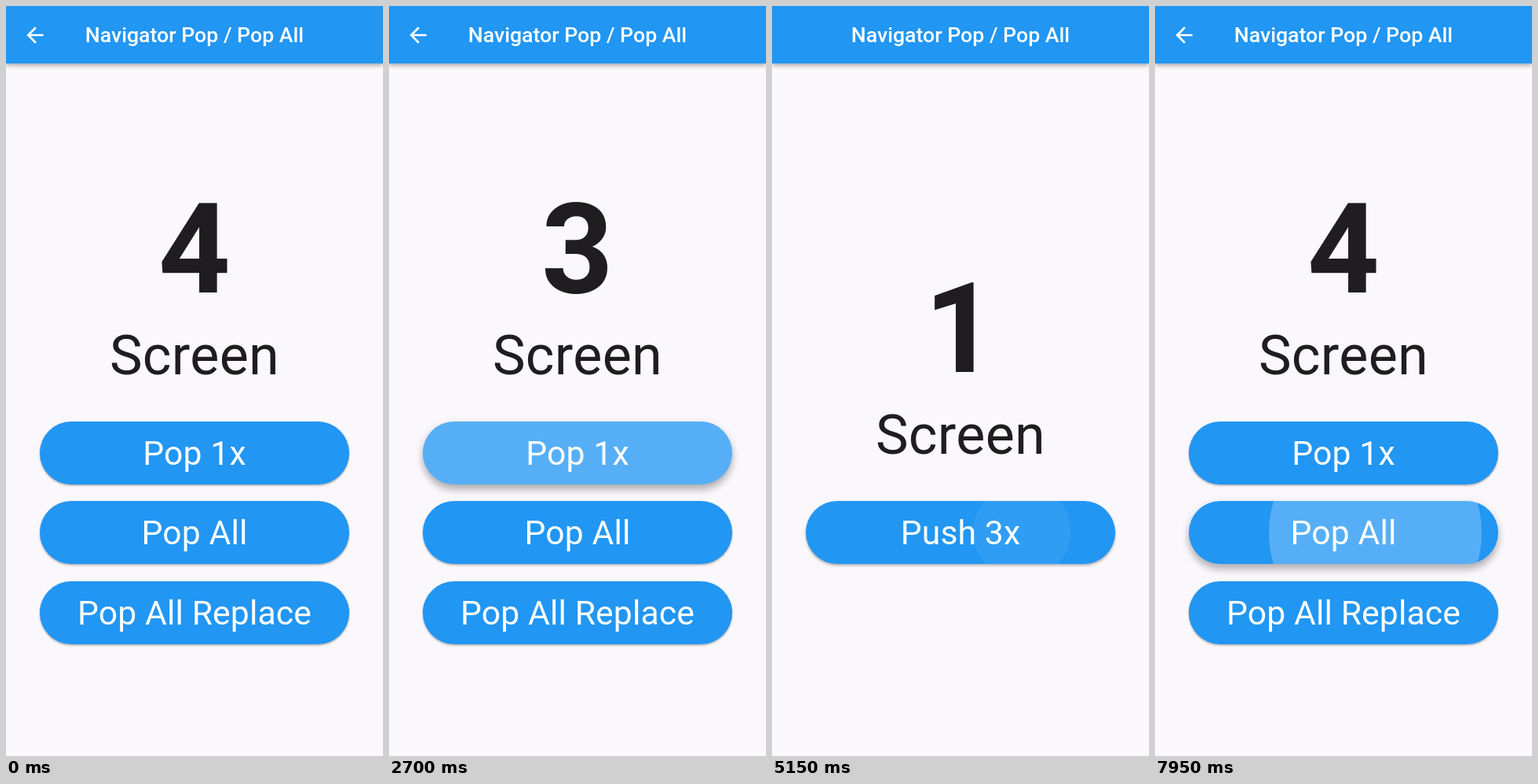
Write an HTML page that moves like this. It is 480 by 953 pixels and loops after 8 s.

```html
<!DOCTYPE html>
<html lang="en">
<head>
<meta charset="utf-8">
<title>Navigator pop and push</title>
<style>
  html, body { margin: 0; width: 100%; height: 100%; overflow: hidden; }
  body { position: relative; background: #faf8fc; font-family: Roboto, sans-serif; }
  div { position: absolute; }
  #stage { left: 0; top: 0; width: 480px; height: 953px; overflow: hidden; }
  .screen { left: 0; top: 0; width: 480px; height: 953px; }
  .page { left: 0; top: -35px; width: 480px; height: 1035px; background: #faf8fc; }
  .bar { left: 0; top: -35px; width: 480px; height: 108px; background: #2196f3; }
  .title, .digit, .label { left: 0; width: 480px; text-align: center; white-space: nowrap; }
  .title { top: 0; line-height: 74px; font-size: 26.67px; font-weight: 500; color: #fff; }
  .digit { top: 210px; line-height: 200px; font-size: 160px; font-weight: 700; color: #201d21; }
  .label { top: 393.5px; line-height: 100px; font-size: 70px; letter-spacing: .33px; color: #201d21; }
  .button { left: 42.67px; width: 394.67px; height: 80px; border-radius: 40px; background: #2196f3; overflow: hidden; }
  .button span { position: relative; display: block; line-height: 80px; font-size: 42.67px; letter-spacing: .13px; text-align: center; white-space: nowrap; color: #fff; }
  .ripple { border-radius: 50%; background: #fff; opacity: 0; }
  svg { position: absolute; left: 21.3px; top: 20.5px; width: 32px; height: 32px; fill: #fff; }
</style>
</head>
<body>
<div id="stage"></div>
<script>
const LOOP = 8000, TRANSITION = 300, SLIDE = 250;
const ROW_TOP = 528, ROW_PITCH = 101.33;

// Routes above the first one: when each is popped and pushed again.
const routes = [
  { screen: 2, pop: 4100, push: 5965 },
  { screen: 3, pop: 2750, push: 5985 },
  { screen: 4, pop: 1190, push: 6084 },
];

// Touches; x and y are relative to the button.
const presses = [
  { screen: 4, row: 0, x: 298, y: 44, down: 20, up: 1190 },
  { screen: 3, row: 0, x: 298, y: 44, down: 1780, up: 2750 },
  { screen: 2, row: 0, x: 301, y: 46, down: 3180, up: 4100 },
  { screen: 1, row: 0, x: 276, y: 39, down: 5130, up: 5965 },
  { screen: 4, row: 1, x: 281, y: 40, down: 7650, up: Infinity },
];

const clamp = v => Math.max(0, Math.min(1, v));
const mix = (a, b, k) => a + (b - a) * k;

function bezier(x1, y1, x2, y2) {
  const at = (s, a, b) => 3 * a * s * (1 - s) ** 2 + 3 * b * s * s * (1 - s) + s ** 3;
  return x => {
    let lo = 0, hi = 1;
    for (let i = 0; i < 24; i++) {
      const mid = (lo + hi) / 2;
      if (at(mid, x1, x2) < x) lo = mid; else hi = mid;
    }
    return at((lo + hi) / 2, y1, y2);
  };
}
const ease = bezier(.25, .1, .25, 1);
const easeIn = bezier(.42, 0, 1, 1);
const fastOutSlowIn = bezier(.4, 0, .2, 1);

const shadow = e =>
  `0 ${e * .9}px ${e * 1.2}px rgba(0,0,0,.22), 0 ${e * .3}px ${e * 1.5}px rgba(0,0,0,.12)`;

function add(parent, className, html = '') {
  const el = document.createElement('div');
  el.className = className;
  el.innerHTML = html;
  return parent.appendChild(el);
}

function makeScreen(number) {
  const root = add(document.getElementById('stage'), 'screen');
  const first = number === 1;
  const shift = first ? ROW_PITCH : 0;
  add(root, 'page');
  add(root, 'bar').style.boxShadow = shadow(4);
  add(root, 'title', 'Navigator Pop / Pop All');
  if (!first) {
    root.insertAdjacentHTML('beforeend',
      '<svg viewBox="0 0 24 24"><path d="M20 11H7.83l5.59-5.59L12 4l-8 8 8 8 1.41-1.41L7.83 13H20z"/></svg>');
  }
  for (const [name, text] of [['digit', number], ['label', 'Screen']]) {
    add(root, name, text).style.transform = `translateY(${shift}px)`;
  }
  const labels = first ? ['Push 3x'] : ['Pop 1x', 'Pop All', 'Pop All Replace'];
  const buttons = labels.map((text, row) => {
    const button = add(root, 'button', `<div class="ripple"></div><span>${text}</span>`);
    button.style.top = ROW_TOP + shift + row * ROW_PITCH + 'px';
    button.style.boxShadow = shadow(2);
    return button;
  });
  return { root, buttons };
}

const screens = [1, 2, 3, 4].map(makeScreen);

function drawRoute({ screen, pop, push }, time) {
  const progress = time < push
    ? 1 - clamp((time - pop) / TRANSITION)
    : clamp((time - push) / TRANSITION);
  const { style } = screens[screen - 1].root;
  style.opacity = progress === 1 ? 1 : easeIn(progress);
  style.visibility = progress > 0 ? 'visible' : 'hidden';
  style.transform = `translateY(${progress === 1 ? 0 : SLIDE * (1 - fastOutSlowIn(progress))}px)`;
}

function pressState({ x, y, down, up }, time) {
  const held = time - down, released = time - up;
  const grown = ease(clamp(held / 1000));
  return {
    lift: clamp(held / 200) * (1 - clamp(released / 200)),
    alpha: .24 * clamp(held / 75) * (1 - clamp((released - 225) / 150)),
    radius: mix(60.4, 206.4, grown),
    cx: mix(x, 197.33, grown),
    cy: mix(y, 40, grown),
  };
}

function drawPress(press, time) {
  const button = screens[press.screen - 1].buttons[press.row];
  const { lift, alpha, radius, cx, cy } = pressState(press, time);
  button.style.boxShadow = shadow(mix(2, 8, lift));
  Object.assign(button.firstChild.style, {
    opacity: alpha,
    left: cx - radius + 'px',
    top: cy - radius + 'px',
    width: radius * 2 + 'px',
    height: radius * 2 + 'px',
  });
}

function frame() {
  const time = performance.now() % LOOP;
  routes.forEach(route => drawRoute(route, time));
  presses.forEach(press => drawPress(press, time));
  requestAnimationFrame(frame);
}
frame();
</script>
</body>
</html>
```
